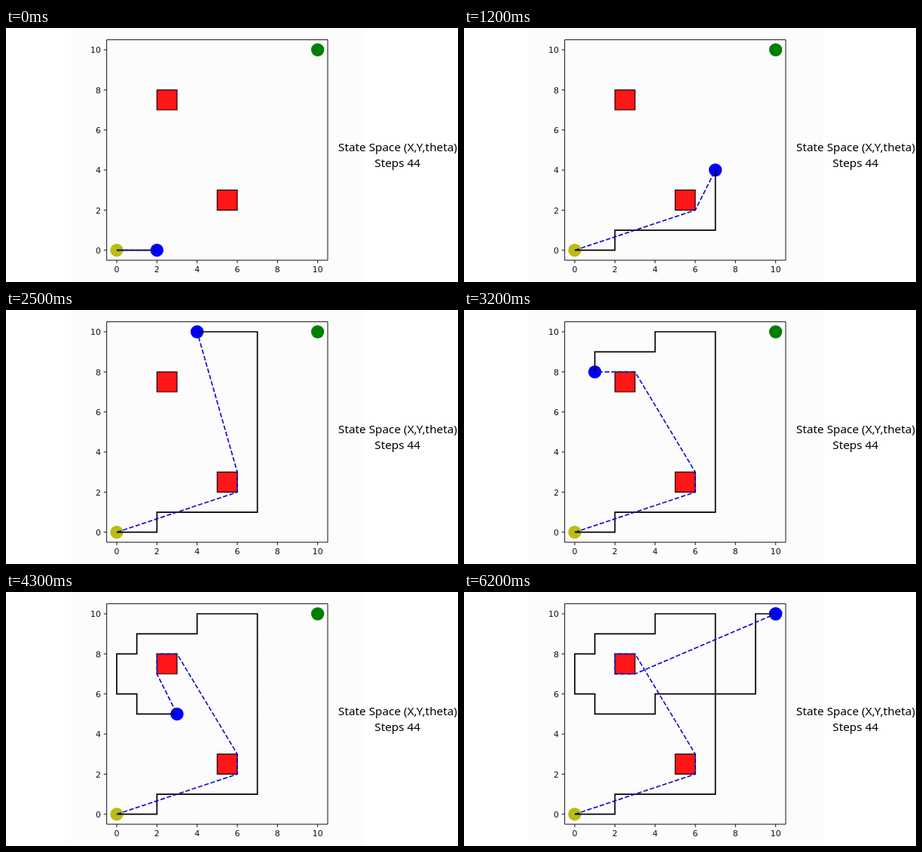
Animation of 600x338 px, one loop 6300 ms. Source, as an HTML page with a canvas:

```html
<!DOCTYPE html>
<html lang="en">
<head>
<meta charset="utf-8">
<title>Tethered robot path</title>
<style>
html, body { margin: 0; width: 100%; height: 100%; overflow: hidden; background: #fff; }
canvas { display: block; }
</style>
</head>
<body>
<canvas id="stage" width="600" height="338"></canvas>
<script>
const ctx = document.getElementById('stage').getContext('2d');
const LOOP = 6300, TICK = 100, UNIT = 26.67;
const px = x => 147 + UNIT * x;
const py = y => 295.7 - UNIT * y;

// Path corners, expanded below to one point per unit step
const corners = [[0, 0], [2, 0], [2, 1], [7, 1], [7, 10], [4, 10], [4, 9], [1, 9], [1, 8],
  [0, 8], [0, 6], [1, 6], [1, 5], [4, 5], [4, 6], [9, 6], [9, 10], [10, 10]];
const path = [[0, 0]];
for (const [cx, cy] of corners) {
  let [x, y] = path[path.length - 1];
  while (x !== cx || y !== cy) {
    x += Math.sign(cx - x);
    y += Math.sign(cy - y);
    path.push([x, y]);
  }
}

// Obstacle corners in the order the tether wraps around them
const pegs = [[0, 0], [6, 2], [6, 3], [3, 8], [2, 8], [2, 7], [3, 7]];

function wraps([ax, ay], [bx, by], [rx, ry]) {
  const ux = bx - ax, uy = by - ay, vx = rx - bx, vy = ry - by;
  return ux * vy - uy * vx > 0 && ux * vx + uy * vy > 0;
}

let held = 1;
const tethers = path.map(robot => {
  while (held < pegs.length && wraps(pegs[held - 1], pegs[held], robot)) held++;
  return [...pegs.slice(0, held), robot];
});

// The run slows slightly as it goes on
function stepAt(ms) {
  const i = Math.floor(ms % LOOP / TICK);
  return Math.min(path.length - 1, 2 + Math.floor(0.8 + 0.72 * i - 0.00075 * i * i));
}

function polyline(points, color, width, dash = []) {
  ctx.beginPath();
  for (const [x, y] of points) ctx.lineTo(px(x), py(y));
  ctx.strokeStyle = color;
  ctx.lineWidth = width;
  ctx.setLineDash(dash);
  ctx.stroke();
  ctx.setLineDash([]);
}

function dot([x, y], color) {
  ctx.beginPath();
  ctx.arc(px(x), py(y), 8.7, 0, 2 * Math.PI);
  ctx.fillStyle = color;
  ctx.fill();
}

function square(x, y) {
  ctx.fillStyle = '#ff1616';
  ctx.strokeStyle = '#200';
  ctx.lineWidth = 1.2;
  ctx.beginPath();
  ctx.rect(px(x), py(y + 1), UNIT, UNIT);
  ctx.fill();
  ctx.stroke();
}

function label(text, x, y, align) {
  ctx.textAlign = align;
  ctx.fillText(text, x, y);
}

function axes() {
  ctx.strokeStyle = ctx.fillStyle = '#111';
  ctx.lineWidth = 1;
  ctx.font = '11px "DejaVu Sans", sans-serif';
  const left = px(-0.5), bottom = py(-0.5);
  ctx.beginPath();
  ctx.rect(left, py(10.5), 11 * UNIT, 11 * UNIT);
  for (let v = 0; v <= 10; v += 2) {
    ctx.moveTo(px(v), bottom);
    ctx.lineTo(px(v), bottom + 3.9);
    ctx.moveTo(left, py(v));
    ctx.lineTo(left - 3.9, py(v));
    label(v, px(v), bottom + 16.2, 'center');
    label(v, left - 7.6, py(v) + 4.2, 'right');
  }
  ctx.stroke();
}

function caption() {
  ctx.fillStyle = '#000';
  ctx.font = '15.3px "Noto Sans", "Open Sans", sans-serif';
  label('State Space (X,Y,theta)', 520, 164, 'center');
  label('Steps 44', 519.7, 184.6, 'center');
}

function draw() {
  const step = stepAt(performance.now());
  ctx.fillStyle = '#fff';
  ctx.fillRect(0, 0, 600, 338);
  ctx.fillStyle = '#fcfcfd';
  ctx.fillRect(86, 0, 390, 338);
  square(5, 2);
  square(2, 7);
  dot([0, 0], '#bcbc10');
  dot([10, 10], '#008000');
  dot(path[step], '#0000f8');
  polyline(path.slice(0, step + 1), '#000', 1.7);
  polyline(tethers[step], '#1010c4', 1.7, [6.1, 2.65]);
  axes();
  caption();
  requestAnimationFrame(draw);
}
draw();
</script>
</body>
</html>
```
